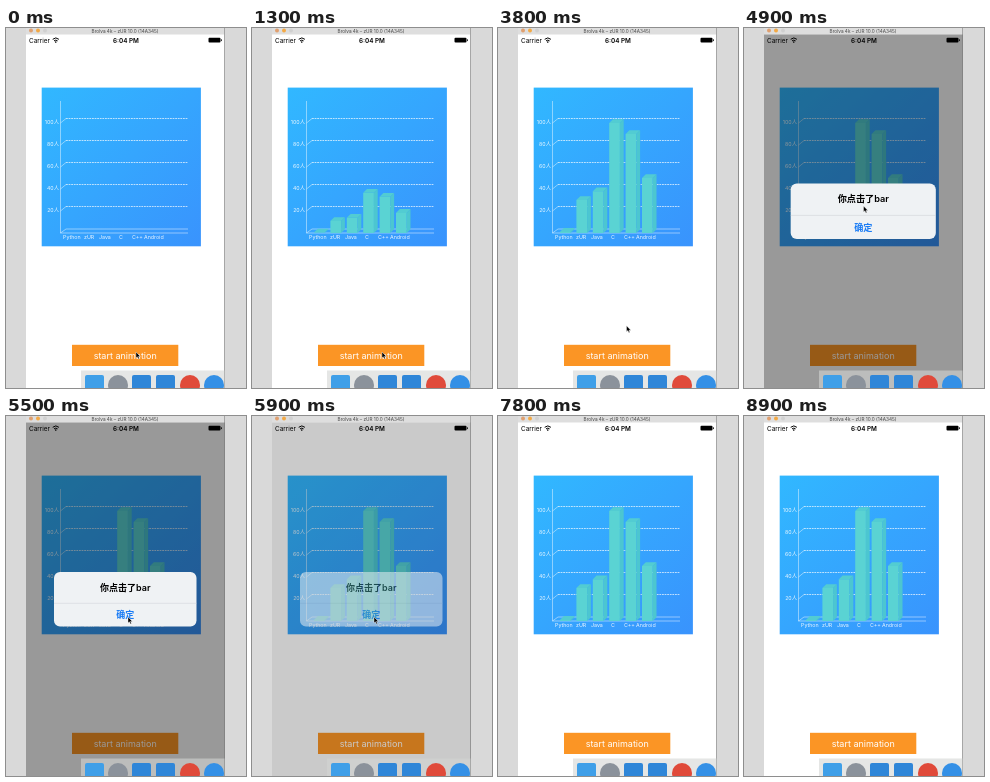
These frames come from a looping animation (240x360 px, 9 s). An HTML page:

```html
<!DOCTYPE html>
<html lang="en">
<head>
<meta charset="utf-8">
<title>Bar chart demo</title>
<style>
  html, body { margin: 0; width: 100%; height: 100%; overflow: hidden; background: #d9d9d9; }
  svg { display: block; width: 240px; height: 360px; font-family: Inter, "Noto Sans CJK SC", "Noto Sans CJK", sans-serif; }
  .mid { text-anchor: middle; }
  .label { font-size: 5.3px; fill: #fff; fill-opacity: .9; }
  .axis { fill: none; stroke: #fff; stroke-width: .6; stroke-opacity: .75; }
  .dash { stroke-width: .8; stroke-dasharray: 1.8 .8; stroke-opacity: .85; }
</style>
</head>
<body>
<svg viewBox="0 0 240 360">
  <defs>
    <linearGradient id="sky" x1="0" y1="0" x2="1" y2="1">
      <stop stop-color="#31b8ff"/><stop offset="1" stop-color="#3993fd"/>
    </linearGradient>
  </defs>

  <rect width="240" height="360" fill="#d9d9d9"/>
  <rect x="20" width="198.5" height="360" fill="#fff"/>
  <rect x="20" width="198.5" height="6.5" fill="#dedede"/>
  <path d="M218.5 0V360" stroke="#777" stroke-width=".6"/>
  <circle cx="25" cy="2.5" r="2" fill="#e0a070"/>
  <circle cx="32" cy="2.5" r="2" fill="#f3a945"/>
  <circle cx="39" cy="2.5" r="2" fill="#d0d0d0"/>
  <text class="mid" x="119" y="4.6" font-size="4.7" fill="#444">Brolva 4k – zUR 10.0 (14A345)</text>

  <!-- status bar -->
  <text x="23" y="14.5" font-size="6.4">Carrier</text>
  <path d="M46.7 11.3Q49.8 8.5 52.9 11.3M48 12.9Q49.8 11.3 51.6 12.9" fill="none" stroke="#000"/>
  <circle cx="49.8" cy="14.1" r=".8"/>
  <text class="mid" x="120" y="14.5" font-size="6.3" font-weight="600">6:04 PM</text>
  <rect x="202.5" y="9.8" width="12" height="4.8" rx="1"/>
  <rect x="215" y="11.3" width=".8" height="1.8"/>

  <rect x="35.7" y="59.6" width="159.2" height="158.7" fill="url(#sky)"/>
  <g id="grid"></g>
  <g id="bars"></g>

  <rect x="66" y="316.8" width="106.3" height="21.2" fill="#fb9525"/>
  <text class="mid" x="119.2" y="331" font-size="9" fill="#fff">start animation</text>

  <rect id="dim" x="20" y="6.5" width="198.5" height="353.5"/>
  <g id="alert">
    <rect x="48" y="156" width="142.5" height="54.5" rx="6" fill="#eff2f4"/>
    <path d="M48 187.3H190.5" stroke="#c9cdd2" stroke-width=".5"/>
    <text class="mid" x="119.3" y="174.6" font-size="9" font-weight="600">你点击了bar</text>
    <text class="mid" x="119.3" y="202.4" font-size="9" font-weight="600" fill="#1a7cf5">确定</text>
  </g>

  <!-- translucent dock -->
  <rect x="75" y="342.5" width="143.5" height="18" fill="#d4d6d4" opacity=".6"/>
  <rect x="79" y="347" width="19" height="19" rx="2" fill="#3f9fe8"/>
  <circle cx="112" cy="357" r="10" fill="#8b929b"/>
  <rect x="126" y="347" width="19" height="19" rx="2" fill="#2f86d8"/>
  <rect x="150" y="347" width="19" height="19" rx="2" fill="#2f86d8"/>
  <circle cx="184" cy="357" r="10" fill="#e04a3a"/>
  <circle cx="208" cy="357" r="10" fill="#3490e6"/>

  <path id="cursor" d="M0 0V6L1.4 4.8L2.4 7L3.4 6.5L2.5 4.4H4.4Z" stroke="#fff" stroke-width=".4"/>
</svg>
<script>
const $ = id => document.getElementById(id);
const LOOP = 9000, BASE = 205, UNIT = 1.1;
const names = ['Python', 'zUR', 'Java', 'C', 'C++', 'Android'];
const labelX = [57, 78, 93, 113, 126, 138];
const values = [1, 30, 38, 100, 90, 50];
// pointer path: time, x, y
const stops = [[0, 130, 324], [3600, 130, 324], [3800, 128.5, 298], [4400, 119.5, 178],
  [4950, 119.5, 178], [5400, 122, 201], [6050, 122, 201], [6500, -8, 230]];

const clamp = v => Math.min(1, Math.max(0, v));
const ramp = (t, a, b) => clamp((t - a) / (b - a));
const mix = (a, b, p) => a + (b - a) * p;

let grid = `<path class="axis" d="M54.5 73V${BASE}H182M54.5 ${BASE}L60 201H182"/>`;
for (let k = 1; k <= 5; k++) {
  const y = BASE - 20 * k * UNIT;
  grid += `<path class="axis" d="M54.5 ${y}L60 ${y - 4.5}"/>
    <path class="axis dash" d="M60 ${y - 4.5}H182"/>
    <text class="label" text-anchor="end" x="53" y="${y + 1.2}">${20 * k}人</text>`;
}
names.forEach((name, i) => grid += `<text class="label" x="${labelX[i]}" y="210.8">${name}</text>`);
$('grid').innerHTML = grid;

function bar(value, i, grow) {
  const x = 62 + 16.4 * i, y = BASE - value * UNIT * grow;
  return `<path fill="#5ad3d3" d="M${x} ${BASE}V${y}h10.7V${BASE}Z"/>
    <path fill="#52ccd2" d="M${x} ${y}l3.8 -3.8h10.7l-3.8 3.8Z"/>
    <path fill="#4cc6d0" d="M${x + 10.7} ${y}l3.8 -3.8V${BASE - 3.8}l-3.8 3.8Z"/>`;
}

function pointer(t) {
  const i = stops.findIndex(s => s[0] > t);
  if (i < 0) return [-20, 0];
  const [a, x, y] = stops[i - 1], [b, x2, y2] = stops[i];
  const p = ramp(t, a, b);
  return [mix(x, x2, p), mix(y, y2, p)];
}

function draw(t) {
  const grow = ramp(t, 570, 2570);
  $('bars').innerHTML = grow ? values.map((v, i) => bar(v, i, grow)).join('') : '';

  const shown = ramp(t, 4600, 4800) * (1 - ramp(t, 5780, 6030));
  const scale = 1 + .2 * (1 - ramp(t, 4600, 5150)) ** 3;
  $('dim').setAttribute('opacity', .4 * shown);
  $('alert').setAttribute('opacity', shown);
  $('alert').setAttribute('transform', `translate(119.3 183.2) scale(${scale}) translate(-119.3 -183.2)`);
  $('cursor').setAttribute('transform', `translate(${pointer(t)})`);
}

const start = performance.now();
(function frame() {
  draw((performance.now() - start) % LOOP);
  requestAnimationFrame(frame);
})();
</script>
</body>
</html>
```
